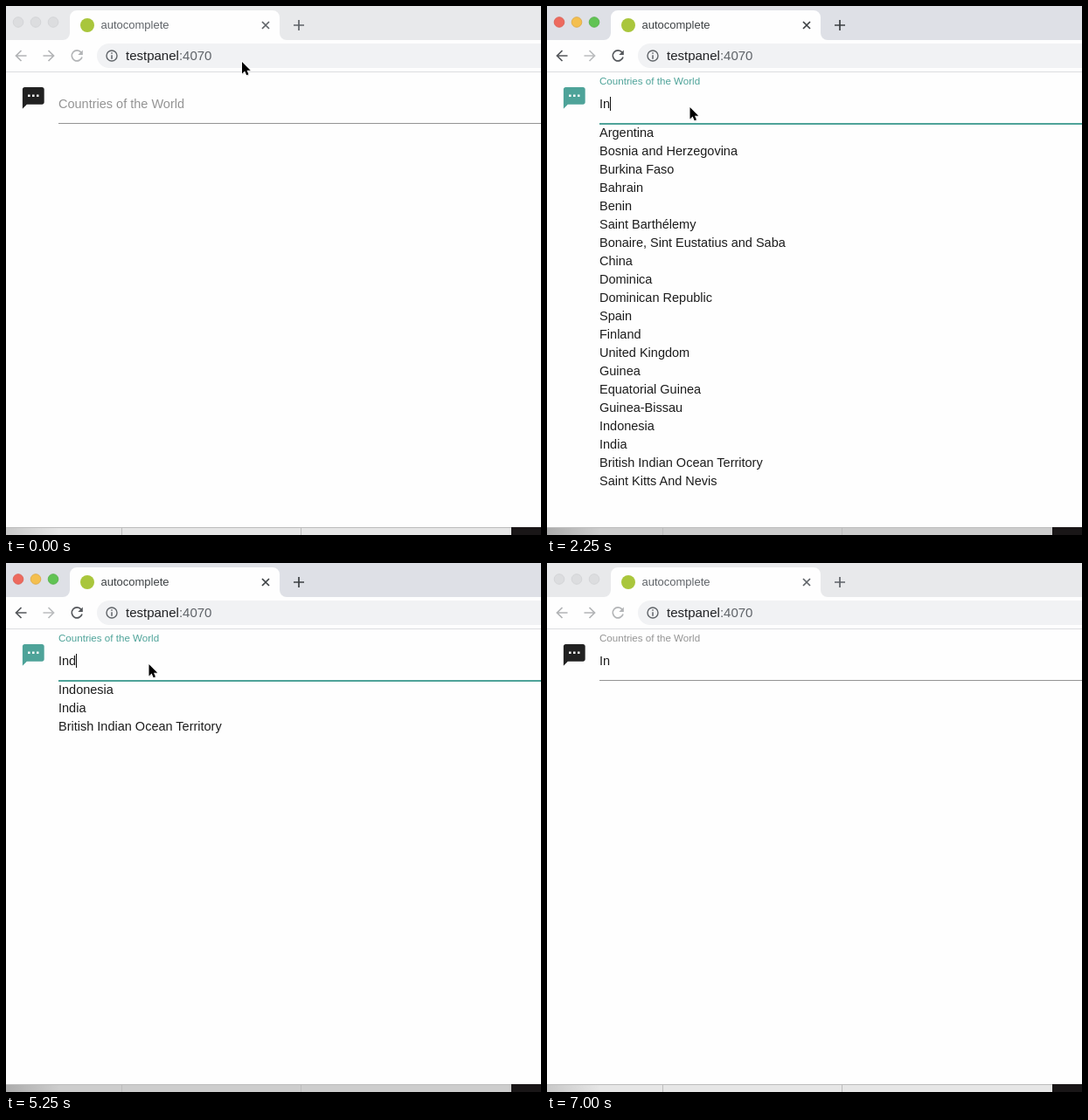
Animation of 612x606 px, one loop 7.25 s. Source, as an HTML page:

```html
<!DOCTYPE html>
<html lang="en">
<head>
<meta charset="utf-8">
<title>autocomplete</title>
<style>
  html, body { margin: 0; width: 100%; height: 100%; overflow: hidden; background: #fefefe; }
  svg { display: block; width: 612px; height: 606px; }
  text { font-family: "Liberation Sans", Arial, sans-serif; white-space: pre; }
  .line { fill: none; stroke-width: 1.7; }
  .frame { --strip: #e8e9eb; --ink: #5f6368; --nav: #b2b4b6; --next: #b2b4b6; --edge: #c8c8c8; --shade: #e6e6e6; }
  .frame.active { --strip: #dee0e6; --ink: #3c4043; --nav: #54575b; --next: #babcbe; --edge: #acacac; --shade: #cdcdcd; }
  .strip { fill: var(--strip); }
  .ink { fill: var(--ink); }
  .line.ink { fill: none; stroke: var(--ink); }
  .nav { stroke: var(--nav); }
  .next { stroke: var(--next); }
  .light { fill: #dcdddf; stroke: #d0d1d3; stroke-width: .8; }
  .active .light { fill: var(--on); stroke: var(--rim); }
  .edge { stop-color: var(--edge); }
  .shade { stop-color: var(--shade); }
</style>
</head>
<body>
<svg viewBox="0 0 612 606" xmlns="http://www.w3.org/2000/svg">
  <rect width="612" height="606" fill="#fefefe"/>

  <g id="frame" class="frame">
    <linearGradient id="shadow">
      <stop class="edge" offset="0"/>
      <stop class="shade" offset=".1"/>
    </linearGradient>
    <rect class="strip" width="612" height="39"/>
    <path d="M65 39a8 8 0 0 0 8-8V13a8 8 0 0 1 8-8H305a8 8 0 0 1 8 8V31a8 8 0 0 0 8 8z" fill="#fefefe"/>
    <circle class="light" style="--on:#ed6a5e;--rim:#d9584c" cx="14" cy="18.5" r="5.8"/>
    <circle class="light" style="--on:#f4bf4f;--rim:#dca53c" cx="34" cy="18.5" r="5.8"/>
    <circle class="light" style="--on:#61c354;--rim:#4fac42" cx="54" cy="18.5" r="5.8"/>
    <circle cx="93" cy="22" r="8" fill="#a9c63c"/>
    <text class="ink" x="108.500" y="26" font-size="13">autocomplete</text>
    <path class="line ink" d="M293 18l8 8m0-8l-8 8M329 22h12m-6-6v12"/>
    <path class="line nav" d="M23.500 57H11.500m6-6l-6 6 6 6"/>
    <path class="line next" d="M42.500 57h12m-6-6l6 6-6 6"/>
    <path class="line nav" d="M86 53.200A6 6 0 1 0 87 58.500"/>
    <path d="M87.800 50.500v5.500h-5.500z" style="fill:var(--nav)"/>
    <path d="M612 43H118a14 14 0 0 0 0 28H612z" fill="#f1f2f4"/>
    <circle cx="121" cy="57" r="6" fill="none" stroke="#5f6368" stroke-width="1.400"/>
    <path d="M121 53.300v1.500m0 1.400v4.500" stroke="#5f6368" stroke-width="1.500"/>
    <text x="137" y="62" font-size="15" fill="#202124">testpanel<tspan fill="#5f6368">:4070</tspan></text>
    <rect y="75" width="612" height="1" fill="#dcdde0"/>

    <rect y="598" width="612" height="8" fill="url(#shadow)"/>
    <rect y="597" width="612" height="1" fill="#bdbdbd"/>
    <path d="M132.500 598v8M337.500 598v8" stroke="#bdbdbd"/>
    <rect x="578" y="597" width="34" height="9" fill="#191617"/>
  </g>

  <path id="icon" transform="translate(16.400 90.400) scale(1.240)" d="M20 2H4c-1.100 0-1.990.9-1.990 2L2 22l4-4h14c1.100 0 2-.9 2-2V4c0-1.100-.9-2-2-2zM9 11H7V9h2v2zm4 0h-2V9h2v2zm4 0h-2V9h2v2z"/>
  <text id="label" x="60">Countries of the World</text>
  <rect id="rule" x="60" y="134" width="552" height="1"/>
  <rect id="thick" x="60" y="135" width="552" height="1"/>
  <text id="typed" x="60" y="117" font-size="14.500" fill="#1c1c1c"></text>
  <rect id="caret" y="104" width="1" height="16" fill="#111"/>
  <g id="list" font-size="14.500" fill="#1c1c1c"></g>
  <g id="pointer">
    <path d="M0 0v13.500l3.100-2.900 2.100 4.700 2.300-1-2-4.500h4.200z" transform="translate(.5 1.300)" fill="#000" opacity=".2"/>
    <path d="M0 0v13.500l3.100-2.900 2.100 4.700 2.300-1-2-4.500h4.200z" fill="#000" stroke="#fff" stroke-width="1.400" paint-order="stroke"/>
  </g>
</svg>

<script>
const LOOP = 7250;
const LIMIT = 20;
const TEAL = [78, 163, 153];
const GREY = [148, 148, 148];
const DARK = [33, 33, 33];

const countries = `United Arab Emirates|Afghanistan|Antigua and Barbuda|Anguilla|Albania|Armenia
Netherlands Antilles|Antarctica|Argentina|American Samoa|Austria|Australia|Åland Islands|Azerbaijan
Bosnia and Herzegovina|Belgium|Burkina Faso|Bulgaria|Bahrain|Burundi|Benin|Saint Barthélemy
Bonaire, Sint Eustatius and Saba|China|Dominica|Dominican Republic|Spain|Finland|United Kingdom
Guinea|Equatorial Guinea|Guinea-Bissau|Indonesia|India|British Indian Ocean Territory
Saint Kitts And Nevis`.split(/[|\n]/);

// Caret offsets follow the advance widths of the letters, in em.
const advance = { I: .278, n: .556, d: .556, i: .222, a: .556 };

// Each step changes only the fields it names.
const steps = [
  [0, { query: '', caret: false, focus: 0, active: false, pointer: [270, 64] }],
  [750, { pointer: [210, 89] }],
  [1000, { pointer: [168, 114] }],
  [1250, { pointer: [163.5, 116], active: true, focus: .9, caret: true }],
  [1500, { focus: 1 }],
  [1750, { caret: false }],
  [2000, { query: 'I', caret: true }],
  [2250, { query: 'In' }],
  [2750, { caret: false }],
  [3000, { query: 'Ind', caret: true }],
  [3500, { query: 'Indi' }],
  [3750, { query: 'India' }],
  [4250, { caret: false }],
  [4500, { query: 'Indi' }],
  [4750, { caret: true }],
  [5250, { query: 'Ind' }],
  [5750, { query: 'In' }],
  [6250, { caret: false }],
  [6500, { pointer: null }],
  [6750, { active: false, focus: .1 }],
  [7000, { focus: 0 }]
];

const el = id => document.getElementById(id);
const [frame, icon, label, rule, thick, typed, caret, list, pointer] =
  ['frame', 'icon', 'label', 'rule', 'thick', 'typed', 'caret', 'list', 'pointer'].map(el);

const set = (node, attrs) => {
  for (const key in attrs) node.setAttribute(key, attrs[key]);
};
const mix = (a, b, k) => `rgb(${a.map((v, i) => Math.round(v + (b[i] - v) * k))})`;

const rows = Array.from({ length: LIMIT }, (_, i) => {
  const row = document.createElementNS('http://www.w3.org/2000/svg', 'text');
  set(row, { x: 60, y: 150 + i * 21 });
  return list.appendChild(row);
});

function stateAt(time) {
  return Object.assign({}, ...steps.filter(([at]) => at <= time).map(([, change]) => change));
}

function search(query) {
  const key = query.toLowerCase();
  return key ? countries.filter(name => name.toLowerCase().includes(key)).slice(0, LIMIT) : [];
}

function draw({ query, caret: blink, focus, active, pointer: spot }) {
  const floating = focus > 0 || query;
  const settling = !query && focus > 0 && focus < 1;
  const tint = mix(GREY, TEAL, focus);

  frame.classList.toggle('active', active);
  set(icon, { fill: mix(DARK, TEAL, focus) });
  set(label, {
    y: settling ? 91 : floating ? 90 : 117,
    'font-size': settling ? 11.76 : floating ? 11.6 : 14.5,
    fill: tint
  });
  set(rule, { fill: tint });
  set(thick, { fill: tint, opacity: focus });

  typed.textContent = query;
  const width = [...query].reduce((sum, ch) => sum + advance[ch] * 14.5, 0);
  set(caret, { x: Math.floor(60 + width), visibility: blink ? 'visible' : 'hidden' });

  const found = focus > 0 ? search(query) : [];
  rows.forEach((row, i) => { row.textContent = found[i] || ''; });

  set(pointer, { visibility: spot ? 'visible' : 'hidden' });
  if (spot) set(pointer, { transform: `translate(${spot})` });
}

const start = performance.now();
let shown = -1;

function tick() {
  const time = Math.max(0, performance.now() - start) % LOOP;
  const step = steps.filter(([at]) => at <= time).length;
  if (step !== shown) {
    shown = step;
    draw(stateAt(time));
  }
  requestAnimationFrame(tick);
}
tick();
</script>
</body>
</html>
```
